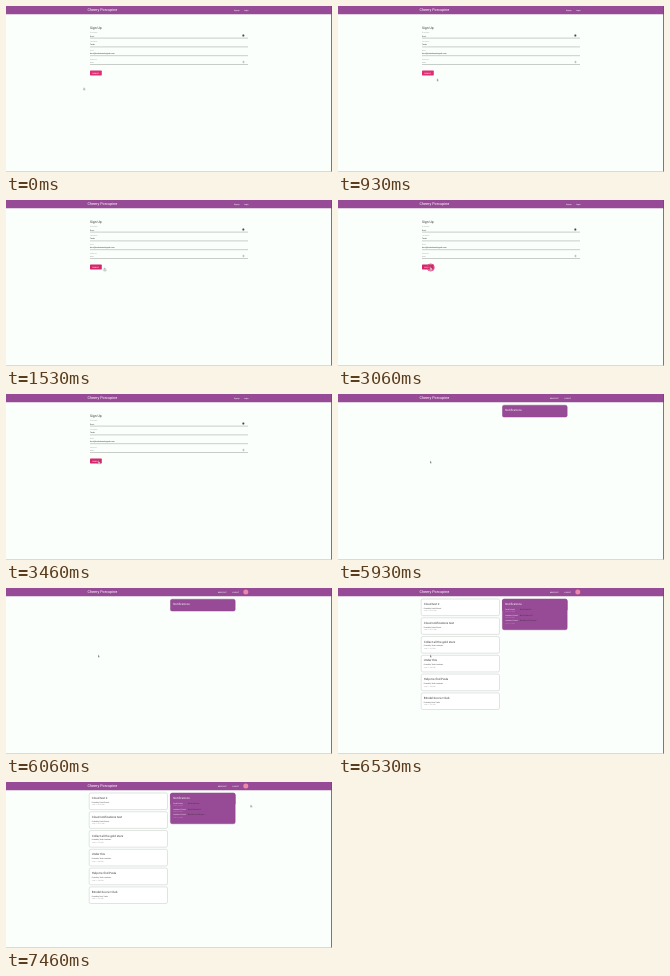
Animation of 326 by 166 pixels, one loop 8000 ms. Source, as an HTML page:

```html
<!DOCTYPE html>
<html lang="en">
<head>
<meta charset="utf-8">
<title>Sign up flow</title>
<style>
  html, body { margin: 0; width: 100%; height: 100%; overflow: hidden; background: #fbfffc; }
  svg { display: block; width: 100%; height: 100%; }
  text { font-family: Roboto, Arial, sans-serif; text-rendering: geometricPrecision; fill: #333; }
  .brand { font-size: 3.8px; fill: #fff; }
  .nav { font-size: 1.75px; font-weight: 500; fill: #fff; }
  .title { font-size: 3.4px; }
  .head { font-size: 2.95px; }
  .label { font-size: 1.5px; fill: #999; }
  .value { font-size: 1.8px; fill: #222; }
  .small { font-size: 1.65px; }
  .date { font-size: 1.55px; fill: #999; }
  .white { fill: #fff; }
  .pale { fill: #c79ac6; }
  .rule { stroke: #8b8f8c; stroke-width: .45; }
  .card { fill: #fefffe; stroke: #bfc3c0; stroke-width: .45; }

  .form, .home, .avatar, .posts, .arrow, .hand, .ring, .button { animation: 8s step-end infinite; }
  .form { animation-name: form; }
  .home { animation-name: home; }
  .avatar { animation-name: avatar; }
  .posts { animation-name: posts; }
  .arrow { animation-name: arrow; }
  .hand { animation-name: hand; }
  .ring { animation-name: ring; }
  .button { animation-name: button; }
  .cursor { animation: move 8s infinite; }

  @keyframes form { 0% { opacity: 1 } 74.125%, 100% { opacity: 0 } }
  @keyframes home { 0% { opacity: 0 } 74.125%, 100% { opacity: 1 } }
  @keyframes avatar { 0% { opacity: 0 } 75.75%, 100% { opacity: 1 } }
  @keyframes posts { 0% { opacity: 0 } 81.625%, 100% { opacity: 1 } }
  @keyframes arrow { 0% { opacity: 1 } 19.125% { opacity: 0 } 74.125%, 100% { opacity: 1 } }
  @keyframes hand { 0% { opacity: 0 } 19.125% { opacity: 1 } 74.125%, 100% { opacity: 0 } }
  @keyframes ring { 0% { opacity: 0 } 38.25% { opacity: 1 } 40% { opacity: .45 } 40.75%, 100% { opacity: 0 } }
  @keyframes button { 0% { fill: #de2f74 } 19.125%, 100% { fill: #d4276b } }
  @keyframes move {
    0% { transform: translate(77.5px, 81.6px); animation-timing-function: step-end }
    .75% { transform: translate(81.7px, 76px) }
    2.5% { transform: translate(81.7px, 76px); animation-timing-function: steps(4, jump-start) }
    6.83% { transform: translate(84.8px, 71.5px) }
    10% { transform: translate(84.8px, 71.5px); animation-timing-function: steps(6, jump-start) }
    15% { transform: translate(127px, 74.8px); animation-timing-function: steps(6, jump-start) }
    20% { transform: translate(92px, 66.8px) }
    87.5% { transform: translate(92px, 66.8px); animation-timing-function: steps(7, jump-start) }
    94.2%, 100% { transform: translate(244.5px, 22.8px) }
  }
</style>
</head>
<body>
<svg viewBox="0 0 326 166" preserveAspectRatio="none">
  <rect width="326" height="166" fill="#fbfffc"/>
  <rect width="326" height="8.2" fill="#974a96"/>
  <rect y="8.2" width="326" height=".5" fill="#d9c9d9"/>
  <text class="brand" x="81.5" y="5.4">Cheery Porcupine</text>

  <g class="form">
    <text class="nav" x="228" y="4.7">Signup</text>
    <text class="nav" x="238" y="4.7">Login</text>
    <text class="title" x="84" y="23.4">Sign Up</text>
    <g id="fields"></g>
    <rect x="236.4" y="28.5" width="1.9" height="2" rx=".4" fill="#444"/>
    <circle cx="237.5" cy="56" r=".7" fill="none" stroke="#888" stroke-width=".5"/>
    <rect class="button" x="84" y="64.6" width="11.8" height="4.8" rx=".6"/>
    <text class="nav" x="86.2" y="67.6">SIGN UP</text>
    <circle class="ring" cx="92.7" cy="67.5" r="3.6" fill="#d4276b" fill-opacity=".35" stroke="#e4477f" stroke-width=".8"/>
  </g>

  <g class="home">
    <text class="nav" x="212" y="4.7">NEW POST</text>
    <text class="nav" x="226.3" y="4.7">LOGOUT</text>
    <rect x="164.4" y="11.2" width="64.8" height="11.9" rx="1.7" fill="#974a96" stroke="#83407f" stroke-width=".4"/>
  </g>
  <circle class="avatar" cx="239.8" cy="4.1" r="2.5" fill="#ef87a6"/>
  <g class="posts">
    <rect x="164.4" y="11.2" width="64.8" height="30.6" rx="1.7" fill="#974a96" stroke="#83407f" stroke-width=".4"/>
    <g id="notes"></g>
    <g id="cards"></g>
  </g>
  <text class="head white home" x="167.2" y="17">Notifications</text>

  <path d="M325.5 0V166" stroke="#565760" stroke-width=".8"/>
  <path d="M0 165.6H326" stroke="#c4c8c5" stroke-width=".7"/>

  <g class="cursor">
    <path class="arrow" d="M0 0V2.4L.6 1.9 1 2.8 1.4 2.6 1 1.7H1.8Z" fill="#555" stroke="#fff" stroke-width=".2"/>
    <path class="hand" d="M.3 0Q.7-.3.9 0V1L2.1 1.3V2.2L1.7 3H.5L-.4 1.8 0 1.5.3 1.7Z" fill="#fff" stroke="#333" stroke-width=".3"/>
  </g>
</svg>
<script>
  const put = (id, html) => document.getElementById(id).innerHTML = html.join('');
  const text = (cls, x, y, s) => `<text class="${cls}" x="${x}" y="${y}">${s}</text>`;

  const fields = [
    ['First Name', 'Dorvi'],
    ['Last Name', 'Tasko'],
    ['Email', 'dorvi@taskohomebrigade.com'],
    ['Password', '••••••']
  ];
  put('fields', fields.map(([label, value], i) => {
    const y = 32.1 + i * 8.8;
    return text('label', 84, y - 5, label) + text('value', 84, y - 1.6, value) +
      `<path class="rule" d="M84 ${y}H242"/>`;
  }));

  const posts = [
    ['Cloud test 2', 'Pavla Primrel', 'June 12 10:41 AM'],
    ['Cloud notifications test', 'Pavla Primrel', 'June 12 10:37 AM'],
    ['Collect all the gold stars', 'Tasko Lumbrino', 'June 11 4:12 PM'],
    ['Under this', 'Tasko Lumbrino', 'June 11 4:09 PM'],
    ['Help me find Pavla', 'Tasko Lumbrino', 'June 11 3:58 PM'],
    ['Brindel Soccer Club', 'Dorvi Tasko', 'June 11 3:51 PM']
  ];
  put('cards', posts.map(([title, by, date], i) => {
    const y = 11 + i * 18.78;
    return `<rect class="card" x="83.2" y="${y}" width="78.3" height="16.6" rx="1.6"/>` +
      text('head', 85.8, y + 6, title) +
      text('small', 85.8, y + 9.9, 'Posted by ' + by) +
      text('date', 85.8, y + 12.4, date);
  }));

  const notes = [
    ['Pavla Primrel', 'liked Under this'],
    ['Lumbrino Primrel', 'liked Cloud test 2'],
    ['Lumbrino Primrel', 'liked Soccer Club post']
  ];
  put('notes', notes.map(([who, what], i) => {
    const y = 21.8 + i * 5.8;
    return text('small white', 167.2, y, who) + text('small', 182, y, what) +
      text('date pale', 167.2, y + 2.3, 'June 12 10:4' + i);
  }));
</script>
</body>
</html>
```
